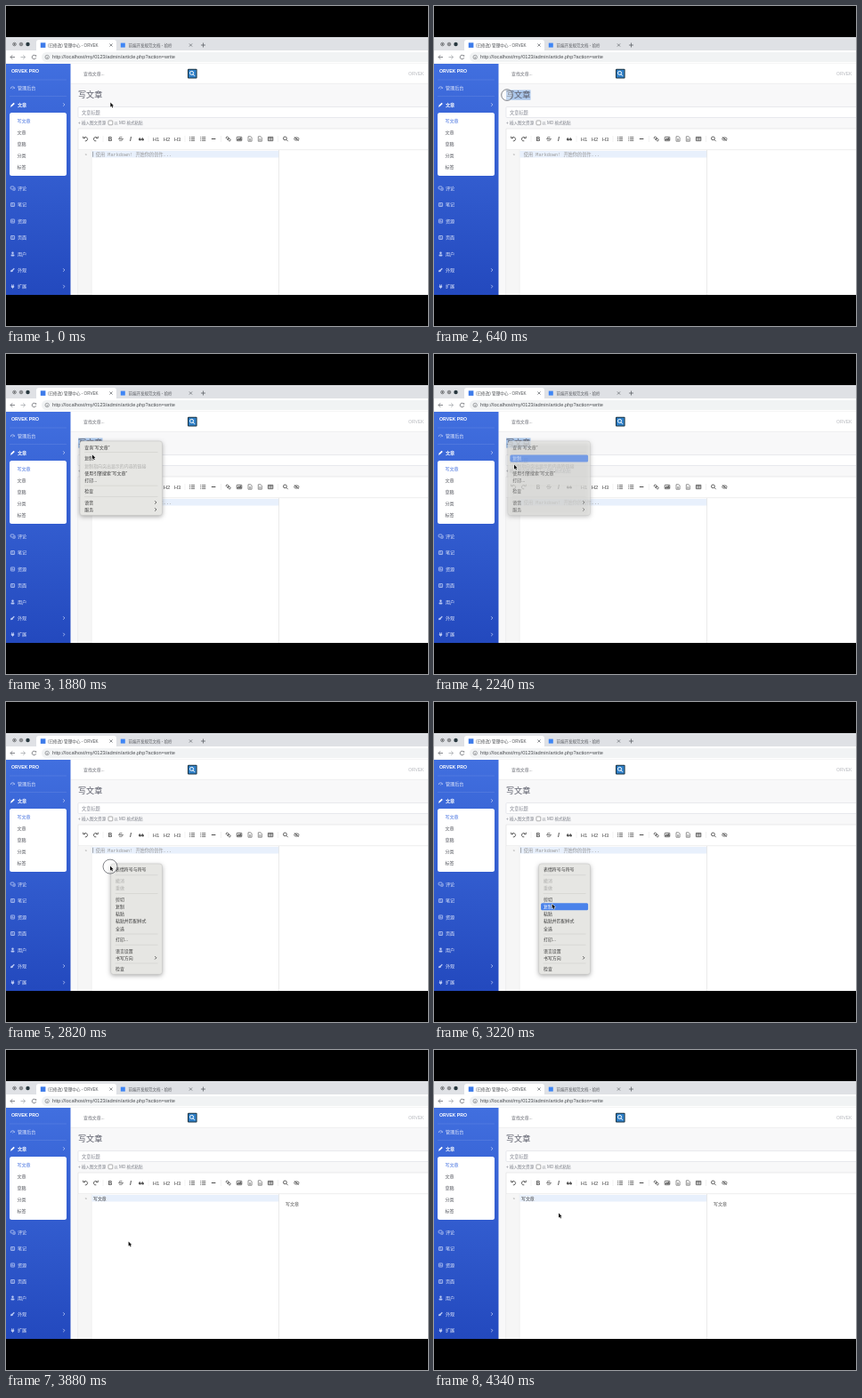
An HTML page with a canvas for the animation above (4360 ms loop, 474 by 360 pixels).

```html
<!DOCTYPE html>
<html lang="zh-CN">
<head>
<meta charset="utf-8">
<style>
html, body { margin: 0; width: 100%; height: 100%; overflow: hidden; background: #000; }
canvas { display: block; width: 474px; height: 360px; }
</style>
</head>
<body>
<canvas id="stage"></canvas>
<script>
const W = 474, H = 360, LOOP = 4360;
const canvas = document.getElementById('stage');
const c = canvas.getContext('2d');
const dpr = window.devicePixelRatio || 1;
canvas.width = W * dpr;
canvas.height = H * dpr;

const SANS = '"Liberation Sans", "Noto Sans CJK SC", "Noto Sans CJK", sans-serif';
const MONO = '"Liberation Mono", "Noto Sans CJK SC", "Noto Sans CJK", monospace';
const BRAND = 'ORVEK';

function rect(x, y, w, h, fill, r = 0) {
  c.fillStyle = fill;
  c.beginPath();
  c.roundRect(x, y, w, h, r);
  c.fill();
}
function frame(x, y, w, h, color, lw = 0.6, r = 0) {
  c.strokeStyle = color;
  c.lineWidth = lw;
  c.beginPath();
  c.roundRect(x, y, w, h, r);
  c.stroke();
}
function text(s, x, y, size, color, weight = '', family = SANS) {
  c.font = `${weight} ${size}px ${family}`;
  c.fillStyle = color;
  c.textBaseline = 'alphabetic';
  c.fillText(s, x, y + size * 0.37);
}
function line(color, lw, ...pts) {
  c.strokeStyle = color;
  c.lineWidth = lw;
  c.beginPath();
  for (let i = 0; i < pts.length; i += 2) c.lineTo(pts[i], pts[i + 1]);
  c.stroke();
}
function ring(x, y, r, color, lw = 0.8, from = 0, to = Math.PI * 2) {
  c.strokeStyle = color;
  c.lineWidth = lw;
  c.beginPath();
  c.arc(x, y, r, from, to);
  c.stroke();
}
function dot(x, y, r, color) {
  c.fillStyle = color;
  c.beginPath();
  c.arc(x, y, r, 0, Math.PI * 2);
  c.fill();
}
function chevron(x, y, color) {
  line(color, 0.8, x - 0.8, y - 1.7, x + 0.9, y, x - 0.8, y + 1.7);
}
function cross(x, y, r, color) {
  line(color, 0.7, x - r, y - r, x + r, y + r);
  line(color, 0.7, x + r, y - r, x - r, y + r);
}
function glass(x, y, r, color, lw) {
  ring(x - 0.6, y - 0.6, r, color, lw);
  line(color, lw, x + r * 0.4, y + r * 0.4, x + r * 1.4, y + r * 1.4);
}

function browser() {
  rect(0, 35, W, 290, '#fff');
  rect(0, 35, W, 15, '#dfe1e5');
  rect(34, 38, 90, 14, '#fff', 3);
  ring(9.5, 43, 1.8, '#6f7174', 0.9);
  dot(9.5, 43, 0.8, '#333');
  ring(17, 43, 1.8, '#6f7174', 0.9);
  dot(17, 43, 0.8, '#333');
  dot(24.5, 43, 2.2, '#27383f');
  rect(38.8, 41.3, 5.6, 5.6, '#3d7bea');
  text(`(已修改) 管理中心 - ${BRAND}`, 47, 44.2, 4.6, '#4c4f53');
  cross(118, 44, 1.6, '#5f6368');
  rect(128.8, 41.6, 5, 5, '#3f86f5');
  text('前端开发规范文档 - 拾岭', 137.5, 44.2, 4.5, '#5b5e63');
  cross(207.5, 44, 1.6, '#5f6368');
  line('#5f6368', 0.8, 219, 44, 224, 44);
  line('#5f6368', 0.8, 221.5, 41.5, 221.5, 46.5);

  rect(0, 50, W, 15, '#fff');
  rect(40, 52, 440, 11, '#f1f3f4', 5.5);
  const gray = '#6a6d72';
  line(gray, 0.8, 10, 57.5, 5, 57.5);
  line(gray, 0.8, 7.2, 55.2, 5, 57.5, 7.2, 59.8);
  line('#a9acb0', 0.8, 16.5, 57.5, 21.5, 57.5);
  line('#a9acb0', 0.8, 19.3, 55.2, 21.5, 57.5, 19.3, 59.8);
  ring(31.5, 57.5, 2.3, gray, 0.8, 0.3, 5.4);
  dot(33.5, 56, 0.8, gray);
  ring(46.2, 57.5, 2.2, gray, 0.6);
  line(gray, 0.7, 46.2, 57, 46.2, 58.9);
  text('http://localhost/my/0123/admin/article.php?action=write', 52, 57.3, 5.66, '#4a4d51');
  line('#e3e4e7', 0.5, 0, 64.8, W, 64.8);
}

const nav = [['管理后台', 92.5], ['文章', 111, 1], ['评论', 205], ['笔记', 223.5], ['资源', 242],
  ['页面', 260.5], ['用户', 279], ['外观', 297, 1], ['扩展', 315.5, 1]];

function navIcon(i, y) {
  const col = i === 1 ? '#fff' : '#b9c8f3', x = 7.5;
  if (i === 0) { ring(x, y + 0.5, 2.2, col, 0.8, Math.PI, Math.PI * 2); line(col, 0.7, x, y + 1, x + 1.2, y - 0.8); }
  else if (i === 1) { line(col, 1.7, x - 1.7, y + 1.7, x + 1.7, y - 1.7); dot(x - 2, y + 2, 0.6, col); }
  else if (i === 2) { frame(x - 2.4, y - 2, 4, 3, col, 0.8, 1); line(col, 0.8, x, y + 2.2, x + 2.6, y + 2.2, x + 2.6, y - 0.6); }
  else if (i === 6) { dot(x, y - 1.3, 1.2, col); rect(x - 2, y + 0.4, 4, 2, col, 1); }
  else if (i === 7) { line(col, 1.3, x - 2, y + 2, x + 1.8, y - 1.8); dot(x - 1, y + 0.9, 1.2, col); }
  else if (i === 8) { rect(x - 1.7, y - 1, 3.4, 2.4, col, 0.8); line(col, 0.7, x - 0.9, y - 2.4, x - 0.9, y); line(col, 0.7, x + 0.9, y - 2.4, x + 0.9, y); line(col, 0.7, x, y + 1, x, y + 2.6); }
  else { frame(x - 2.1, y - 2, 4.2, 4, col, 0.8, 0.4); line(col, 0.7, x - 1.2, y + 0.6, x + 1.3, y + 0.6); line(col, 0.7, x - 1.2, y - 0.7, x + 0.6, y - 0.7); }
}

function sidebar() {
  const g = c.createLinearGradient(0, 65, 0, 325);
  g.addColorStop(0, '#416fdf');
  g.addColorStop(1, '#2349be');
  rect(0, 65, 72.5, 260, g);
  text(BRAND + ' PRO', 6, 73.3, 5.2, '#fff', 'bold');
  line('rgba(255,255,255,.18)', 0.5, 4, 83, 68, 83);
  line('rgba(255,255,255,.18)', 0.5, 4, 101.5, 68, 101.5);
  nav.forEach(([label, y, more], i) => {
    navIcon(i, y);
    text(label, 13, y, 5.1, i === 1 ? '#fff' : '#e3e9fb', i === 1 ? 'bold' : '');
    if (more) chevron(65, y, '#c3d0f5');
  });
  rect(4, 120, 64, 71, '#fff', 2.5);
  ['写文章', '文章', '草稿', '分类', '标签'].forEach((s, i) =>
    text(s, 12.5, 129.5 + i * 13, 5, i ? '#55575f' : '#416fdf'));
}

function toolbar() {
  const k = '#4d4d4d', y = 149.5;
  ring(89.3, y + 0.2, 2.2, k, 0.9, -2.4, 1.8);
  line(k, 0.9, 86.6, y - 2.8, 86.8, y - 0.7, 89, y - 0.9);
  ring(100.7, y + 0.2, 2.2, k, 0.9, 1.3, 5.5);
  line(k, 0.9, 103.4, y - 2.8, 103.2, y - 0.7, 101, y - 0.9);
  text('B', 114.8, y, 6.3, k, 'bold');
  text('S', 126.8, y, 6.3, k);
  line(k, 0.6, 126, y, 132, y);
  text('I', 139, y, 6.5, k, 'italic bold');
  for (const x of [150.5, 153.6]) {
    dot(x, y + 0.7, 1.3, k);
    ring(x + 0.6, y + 0.5, 1.8, k, 0.7, 3.1, 4.6);
  }
  [1, 2, 3].forEach(n => text('H' + n, 152.7 + n * 12, y, 6, k));
  for (const x of [209, 221.3]) for (let i = -1; i < 2; i++) {
    line(k, 0.8, x - 1.2, y + i * 1.9, x + 3, y + i * 1.9);
    line(k, 0.9, x - 3, y + i * 1.9, x - 2.1, y + i * 1.9);
  }
  line(k, 1, 230.8, y, 235.4, y);
  c.save();
  c.translate(249.7, y);
  c.rotate(0.75);
  frame(-3, -1.1, 3.4, 2.2, k, 0.8, 1.1);
  frame(-0.4, -1.1, 3.4, 2.2, k, 0.8, 1.1);
  c.restore();
  frame(259.2, y - 2.2, 5.6, 4.4, k, 0.8, 0.5);
  line(k, 1.1, 260, y + 1.4, 261.4, y - 0.2, 262.3, y + 0.8, 263.3, y - 0.6, 264.3, y + 1.4);
  for (const x of [274, 285.3]) {
    line('#686868', 0.7, x - 2, y - 2.7, x + 0.8, y - 2.7, x + 2.1, y - 1.3, x + 2.1, y + 2.7, x - 2, y + 2.7, x - 2, y - 2.7);
    line('#686868', 0.7, x - 1, y + 0.3, x + 1.1, y + 0.3);
    line('#686868', 0.7, x - 1, y + 1.5, x + 1.1, y + 1.5);
  }
  frame(294.4, y - 2.2, 5.4, 4.4, k, 0.8);
  line(k, 0.8, 294.4, y - 0.8, 299.8, y - 0.8);
  line(k, 0.5, 294.4, y + 0.8, 299.8, y + 0.8);
  line(k, 0.5, 297.1, y - 2, 297.1, y + 2);
  glass(314, y, 1.9, k, 0.9);
  c.strokeStyle = k;
  c.lineWidth = 0.8;
  c.beginPath();
  c.ellipse(326.3, y, 2.7, 1.6, 0, 0, Math.PI * 2);
  c.stroke();
  dot(326.3, y, 0.8, k);
  line(k, 0.8, 323.8, y - 2, 328.8, y + 2);
  for (const x of [109, 160, 201, 241.5, 305.5]) line('#e4e4e4', 0.5, x, 146, x, 153);
}

function page(t) {
  rect(72.5, 65, W, 22, '#fff');
  text('查找文章...', 87, 76, 4.9, '#686a72');
  rect(204, 70.8, 10.6, 10.6, '#1d3442', 1);
  rect(205, 71.8, 8.6, 8.6, '#2f80c8', 0.5);
  glass(209.2, 76, 2, '#fff', 1);
  text(BRAND, 452, 76, 5, '#b6b8be');
  rect(72.5, 87, W, 238, '#f8f8f9');
  line('#ededf0', 0.8, 72.5, 87.3, W, 87.3);

  if (t >= 500 && t < 2700) rect(81, 94.5, 27.5, 11.2, '#aac6ea');
  text('写文章', 81, 100, 9.1, '#5a5c69');
  rect(81, 113.5, 400, 12, '#fff');
  frame(81, 113.5, 400, 12, '#dcdee5', 0.6, 1);
  text('文章标题', 85, 119.7, 5.2, '#868994');
  text('+ 插入图文资源', 81, 131.7, 4.55, '#7d808a');
  rect(115, 129, 4.8, 4.8, '#fff', 0.8);
  frame(115, 129, 4.8, 4.8, '#777', 0.6, 0.8);
  text('以 MD 格式粘贴', 121.3, 131.7, 4.55, '#7d808a');

  rect(81, 138, 400, 190, '#fff');
  line('#dedede', 0.6, 81, 325, 81, 138, W, 138);
  line('#e2e2e2', 0.6, 81, 161.7, W, 161.7);
  toolbar();
  rect(81.3, 162, 15, 163, '#f6f6f6');
  line('#e6e6e6', 0.5, 96.2, 162, 96.2, 325);
  rect(96.4, 163, 210, 7.6, '#e8f0fc');
  line('#dcdcdc', 0.6, 306.5, 162, 306.5, 325);
  text('1', 88.6, 166.7, 4.4, '#999', '', MONO);

  if (t < PASTE) {
    text('使用 Markdown! 开始你的创作...', 100.8, 166.7, 5.2, '#999', '', MONO);
    if (t < 480 || t > 2740) line('#555', 0.5, 97.6, 163.8, 97.6, 169.8);
  } else {
    text('写文章', 98, 166.7, 4.9, '#444', '', MONO);
    text('写文章', 314, 173, 5, '#555');
  }
}

// Menu rows: [label, y, disabled, arrow]; a bare number is a separator.
const PASTE = 3680;
const menus = [
  { x: 83, y: 98, w: 92.5, h: 83.5, open: 1640, pick: 2080, close: 2200, item: '复制', rows: [
    ['查询“写文章”', 104.7], 110.5, ['复制', 117.4], ['复制指向突出显示的内容的链接', 125.7, 1],
    ['使用引擎搜索“写文章”', 133.8], ['打印...', 142], 148.2, ['检查', 154.6], 160.6,
    ['语音', 167, 0, 1], ['服务', 175, 0, 1]] },
  { x: 117.7, y: 182, w: 57.8, h: 124.3, open: 2760, pick: 3540, close: 3640, item: '粘贴', rows: [
    ['表情符号与符号', 188.5], 194.7, ['撤消', 201.6, 1], ['重做', 209.6, 1], 215.5, ['剪切', 222],
    ['复制', 230.2], ['粘贴', 238.4], ['粘贴并匹配样式', 246.6], ['全选', 254.8], 261,
    ['打印...', 267.2], 273.3, ['语言设置', 279.8], ['书写方向', 287.8, 0, 1], 294, ['检查', 300.3]] }
];

function menu(m, t, p) {
  const fade = 1 - (t - m.close) / 140;
  if (t < m.open || fade <= 0) return;
  c.save();
  c.globalAlpha = Math.min(1, fade);
  c.shadowColor = 'rgba(0,0,0,.35)';
  c.shadowBlur = 5 * dpr;
  c.shadowOffsetY = 1.5 * dpr;
  rect(m.x, m.y, m.w, m.h, '#e6e6e3', 3);
  c.shadowColor = 'transparent';
  frame(m.x, m.y, m.w, m.h, '#c2c2c0', 0.5, 3);
  for (const row of m.rows) {
    if (typeof row === 'number') {
      line('#cfcfcc', 0.6, m.x + 5, row, m.x + m.w - 5, row);
      continue;
    }
    const [label, y, off, arrow] = row;
    const hot = t >= m.pick ? label === m.item
      : !off && p[0] > m.x + 1 && Math.abs(p[1] - y) < 4.1;
    if (hot) rect(m.x + 2.4, y - 4, m.w - 4.8, 8, '#4a82ea', 1.5);
    const col = hot ? '#fff' : off ? '#aeaeac' : '#3c3c3c';
    text(label, m.x + 5.3, y, 4.95, col);
    if (arrow) chevron(m.x + m.w - 7.5, y, col);
  }
  c.restore();
}

// Pointer stops: [time, x, y].
const path = [[0, 117.3, 108.5], [120, 117, 108], [480, 82, 99.5], [1700, 82, 99.5], [1960, 101, 117],
  [2160, 101, 117], [2240, 90, 124.5], [2680, 117, 184.5], [2900, 117, 184.5], [3340, 136, 236.5],
  [3700, 136, 236.5], [4120, 140, 183.5], [LOOP, 140, 183.5]];

function pointer(t) {
  let i = 1;
  while (i < path.length - 1 && path[i][0] < t) i++;
  const [t0, x0, y0] = path[i - 1], [t1, x1, y1] = path[i];
  const u = (t - t0) / (t1 - t0), e = u * u * (3 - 2 * u);
  return [x0 + (x1 - x0) * e, y0 + (y1 - y0) * e];
}

function arrow([x, y]) {
  const shape = [0, 0, 0, 5.2, 1.2, 4.1, 2.1, 6, 3, 5.6, 2.1, 3.8, 3.7, 3.7];
  c.beginPath();
  for (let i = 0; i < shape.length; i += 2) c.lineTo(x + shape[i], y + shape[i + 1]);
  c.closePath();
  c.strokeStyle = '#fff';
  c.lineWidth = 1;
  c.stroke();
  c.fillStyle = '#111';
  c.fill();
}

// Press rings: [start, end, radius].
const presses = [[540, 740, 6.3], [1580, 1740, 7], [2080, 2190, 7], [2720, 2900, 8], [3480, 3560, 7]];

function draw(now) {
  const t = now % LOOP;
  c.setTransform(dpr, 0, 0, dpr, 0, 0);
  rect(0, 0, W, H, '#000');
  browser();
  page(t);
  sidebar();
  const p = pointer(t);
  menus.forEach(m => menu(m, t, p));
  for (const [a, b, r] of presses) if (t >= a && t < b) {
    dot(p[0], p[1] + 0.6, r, 'rgba(255,255,255,.3)');
    ring(p[0], p[1] + 0.6, r, '#62656b', 0.8);
  }
  if (t < 480 || t > 1640) arrow(p);
  rect(0, 325, W, 35, '#000');
}

const start = performance.now();
function tick() {
  draw(performance.now() - start);
  requestAnimationFrame(tick);
}
tick();
</script>
</body>
</html>
```
